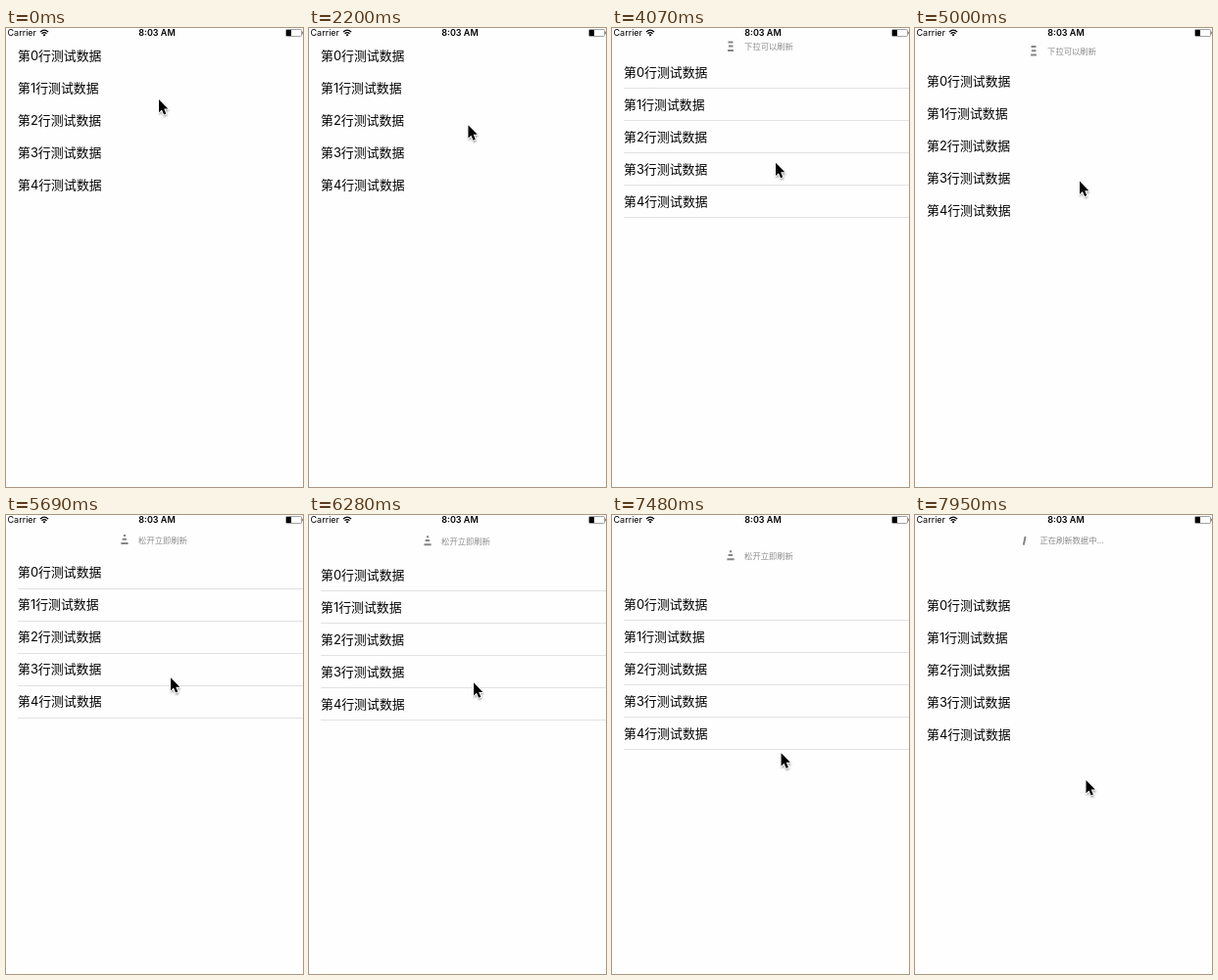
An HTML page for the animation above (8000 ms loop, 303 px wide and 469 px high).

```html
<!DOCTYPE html>
<html lang="zh-CN">
<head>
<meta charset="utf-8">
<title>Pull to refresh</title>
<style>
  html, body { margin: 0; width: 100%; height: 100%; overflow: hidden; background: #fefefe; }
  svg { display: block; width: 303px; height: 469px; }
  text { font-family: Inter, "Noto Sans CJK SC", "Noto Sans CJK", sans-serif; }
  #rows text { font-size: 12.9px; }
  #lines { stroke: #e2e2e4; }
  #label { font-size: 8.3px; fill: #8c8c8c; text-anchor: middle; }
  .status { font-size: 9px; }
  .time { font-weight: 600; text-anchor: middle; }
</style>
</head>
<body>
<svg viewBox="0 0 303 469">
  <defs>
    <clipPath id="below"><rect y="12" width="303" height="457"/></clipPath>
    <filter id="soft" x="-50%" y="-50%" width="200%" height="200%"><feGaussianBlur stdDeviation="0.9"/></filter>
    <path id="arrow" d="M0 0V13.2L3 10.4L5.1 15.4L7.3 14.4L5.2 9.6H9.3Z"/>
  </defs>
  <rect width="303" height="469" fill="#fefefe"/>

  <g clip-path="url(#below)">
    <g id="header">
      <text id="label" x="160" y="3.1"></text>
      <path id="bars" stroke="#858585" stroke-width="2" fill="none"/>
    </g>
    <g id="rows"></g>
    <path id="lines"/>
  </g>

  <text class="status" x="1.5" y="8">Carrier</text>
  <text class="status time" x="154" y="8">8:03 AM</text>
  <g fill="none" stroke="#000" stroke-width="1.3">
    <path d="M34.9 4.1Q39 .2 43.1 4.1"/>
    <path d="M36.5 5.8Q39 3.5 41.5 5.8"/>
  </g>
  <path d="M37.5 6.9Q39 5.7 40.5 6.9L39 8.5Z"/>
  <rect x="285.5" y="1.5" width="16" height="7" rx="1" fill="none" stroke="#8a8a8a" stroke-width=".8"/>
  <rect x="286" y="2" width="5" height="6"/>
  <rect x="302" y="3.7" width="1" height="2.6" fill="#8a8a8a"/>

  <g id="cursor">
    <use href="#arrow" x=".5" y="1.8" stroke="#000" opacity=".45" filter="url(#soft)"/>
    <use href="#arrow" stroke="#fff" stroke-width="2" stroke-linejoin="round"/>
    <use href="#arrow"/>
  </g>
</svg>

<script>
const LOOP = 8000;
const FRAME = 57.96;     // screen update interval
const FIRST_PULL = 2560;
const ROW = 33;
const ARMED = 5335;      // pulled far enough
const RELEASED = 7842;
const REST = 31;         // gap kept open while refreshing
const SETTLE = 400;
const SPIN_STEP = 100;

// time, x, y
const cursorPath = [
  [400, 156, 73], [570, 156.5, 77], [850, 156.5, 77], [1610, 162, 96.5],
  [2200, 162.5, 99.5], [2500, 162.5, 99.5], [4070, 167, 137.8], [5000, 168, 156.7],
  [5690, 168, 166.2], [6690, 168, 175], [7020, 168, 192], [7530, 173, 248],
  [7950, 174.5, 271]
];

const $ = id => document.getElementById(id);
const move = (el, x, y) => el.setAttribute("transform", `translate(${x} ${y})`);
const held = t => Math.max(0, FIRST_PULL + Math.floor((t - FIRST_PULL) / FRAME + 0.1) * FRAME);

function cursorAt(t) {
  const next = cursorPath.findIndex(k => k[0] > t);
  if (next === 0) return cursorPath[0].slice(1);
  if (next < 0) return cursorPath[cursorPath.length - 1].slice(1);
  const [t0, x0, y0] = cursorPath[next - 1];
  const [t1, x1, y1] = cursorPath[next];
  const p = (t - t0) / (t1 - t0);
  return [x0 + (x1 - x0) * p, y0 + (y1 - y0) * p];
}

// rubber band: the list follows the finger less and less
function stretch(t) {
  const drag = 0.56 * Math.max(0, cursorAt(t)[1] - 106.3);
  return drag / (1 + drag / 350);
}

function pull(t) {
  if (t < RELEASED) return stretch(t);
  const from = stretch(RELEASED);
  const p = Math.min(1, (t - RELEASED) / SETTLE);
  return from + (REST - from) * (1 - Math.cos(Math.PI * p)) / 2;
}

// horizontal strokes: centre x, y, width
const strokes = (...list) => list.map(([x, y, w]) => `M${x - w / 2} ${y}h${w}`).join("");

const idleBars = strokes([121, -4.5, 5], [121.2, -0.4, 4.6], [121, 4, 5.8]);
const spinner = [
  strokes([121, -4.8, 2.2], [120.8, -1, 4.4], [121, 3.3, 7.2]),
  strokes([118, -3.6, 6], [118.4, 0.5, 7.6], [118.2, 4.8, 4]),
  "M110.8 4.6L112.6 -4"
];

function labelAt(t) {
  if (t < ARMED) return "下拉可以刷新";
  return t < RELEASED ? "松开立即刷新" : "正在刷新数据中...";
}

function draw(t) {
  const y = pull(t);
  move($("rows"), 0, y);
  move($("lines"), 0, Math.round(y));
  // hairlines survive downscaling only at some sub-pixel offsets
  $("lines").style.display = y % 1 >= 0.5 ? "" : "none";

  const gap = t < RELEASED ? y : REST;
  const turn = Math.floor((t - ARMED) / SPIN_STEP) % spinner.length;
  move($("header"), 0, 10.5 + gap / 2);
  $("header").style.display = y > 0 ? "" : "none";
  $("label").textContent = labelAt(t);
  $("bars").setAttribute("d", t < ARMED ? idleBars : spinner[turn]);

  move($("cursor"), ...cursorAt(t));
}

let rows = "", lines = "";
for (let i = 0; i < 5; i++) {
  rows += `<text x="12" y="${32.8 + i * ROW}">第${i}行测试数据</text>`;
  lines += `M12 ${44.5 + i * ROW}H303`;
}
$("rows").innerHTML = rows;
$("lines").setAttribute("d", lines);

const begin = performance.now();
function tick() {
  draw(held((performance.now() - begin) % LOOP));
  requestAnimationFrame(tick);
}
tick();
</script>
</body>
</html>
```
